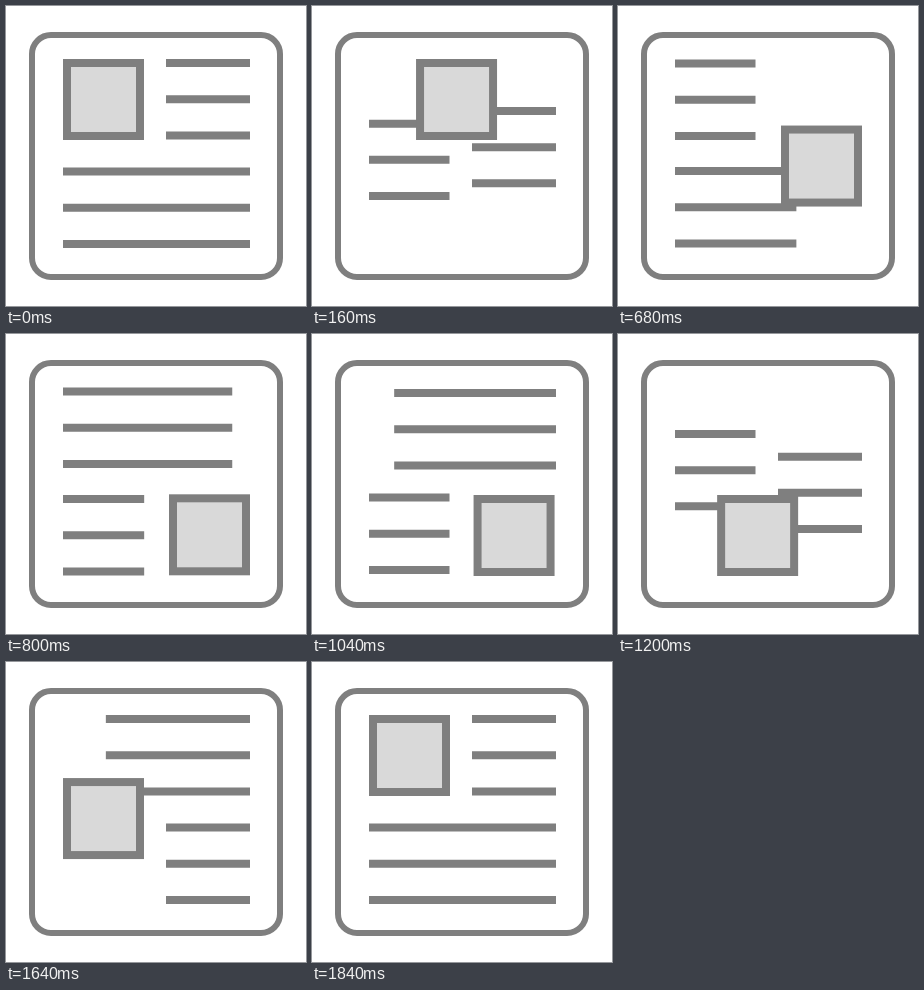
Recreate the animation shown at these times as an HTML page. Size 300 px wide and 300 px high, loop 2040 ms.

```html
<!DOCTYPE html>
<html lang="en">
<head>
<meta charset="utf-8">
<title>Article layout</title>
<style>
  html, body {
    margin: 0;
    width: 100%;
    height: 100%;
    overflow: hidden;
    background: #fff;
  }
  svg { display: block; }
  .card, .photo { stroke: #7f7f7f; fill: none; }
  .card { stroke-width: 6; }
  .photo { stroke-width: 8; fill: #d9d9d9; }
  .lines { fill: #7f7f7f; }
</style>
</head>
<body>
<svg width="300" height="300" viewBox="0 0 300 300">
  <rect class="card" x="26" y="29" width="248" height="242" rx="19"/>
  <path class="lines" id="a"/>
  <path class="lines" id="b"/>
  <rect class="photo" id="photo" width="73" height="73"/>
</svg>
<script>
  const LOOP = 2040, TICK = 40;
  const MOVES = [12, 495, 1018, 1498]; // start of each move, ms
  const MOVE = 320, SNAP = 90;         // length of a move and of a quick resize

  // Stops for the blocks and line ends
  const LEFT = 57, RIGHT = 244, TOP = 53;
  const DX = 106, DY = 108, CUT_LEFT = 103, CUT_RIGHT = 106.5;
  const PITCH = 36.2, THICK = 8;

  const photo = document.getElementById('photo');
  const a = document.getElementById('a');
  const b = document.getElementById('b');

  const ramp = (t, start, length) => Math.min(1, Math.max(0, (t - start) / length));
  const smooth = u => u * u * (3 - 2 * u);

  function drawLines(path, left, right, top) {
    let d = '';
    for (let i = 0; i < 3; i++) {
      d += `M${left} ${top + i * PITCH}H${right}v${THICK}H${left}z`;
    }
    path.setAttribute('d', d);
  }

  function draw(t) {
    const glide = MOVES.map(s => smooth(ramp(t, s, MOVE)));
    const shrink = MOVES.map(s => ramp(t, s, SNAP));
    const grow = MOVES.map(s => ramp(t, s + MOVE - SNAP, SNAP));
    const across = glide[0] - glide[2];
    const down = glide[1] - glide[3];

    photo.setAttribute('x', LEFT + 4 + DX * across);
    photo.setAttribute('y', TOP + 4 + DY * down);

    drawLines(a,
      LEFT + CUT_LEFT * (1 - grow[0] + glide[3]),
      RIGHT - CUT_RIGHT * (glide[1] - grow[2]),
      TOP + DY * across);
    drawLines(b,
      LEFT + CUT_LEFT * (shrink[2] - grow[3]),
      RIGHT - CUT_RIGHT * (shrink[0] - grow[1]),
      TOP + 0.6 + DY * (1 - across));
  }

  function frame() {
    const t = performance.now() % LOOP;
    draw(Math.floor((t + 0.5) / TICK) * TICK);
    requestAnimationFrame(frame);
  }
  frame();
</script>
</body>
</html>
```
